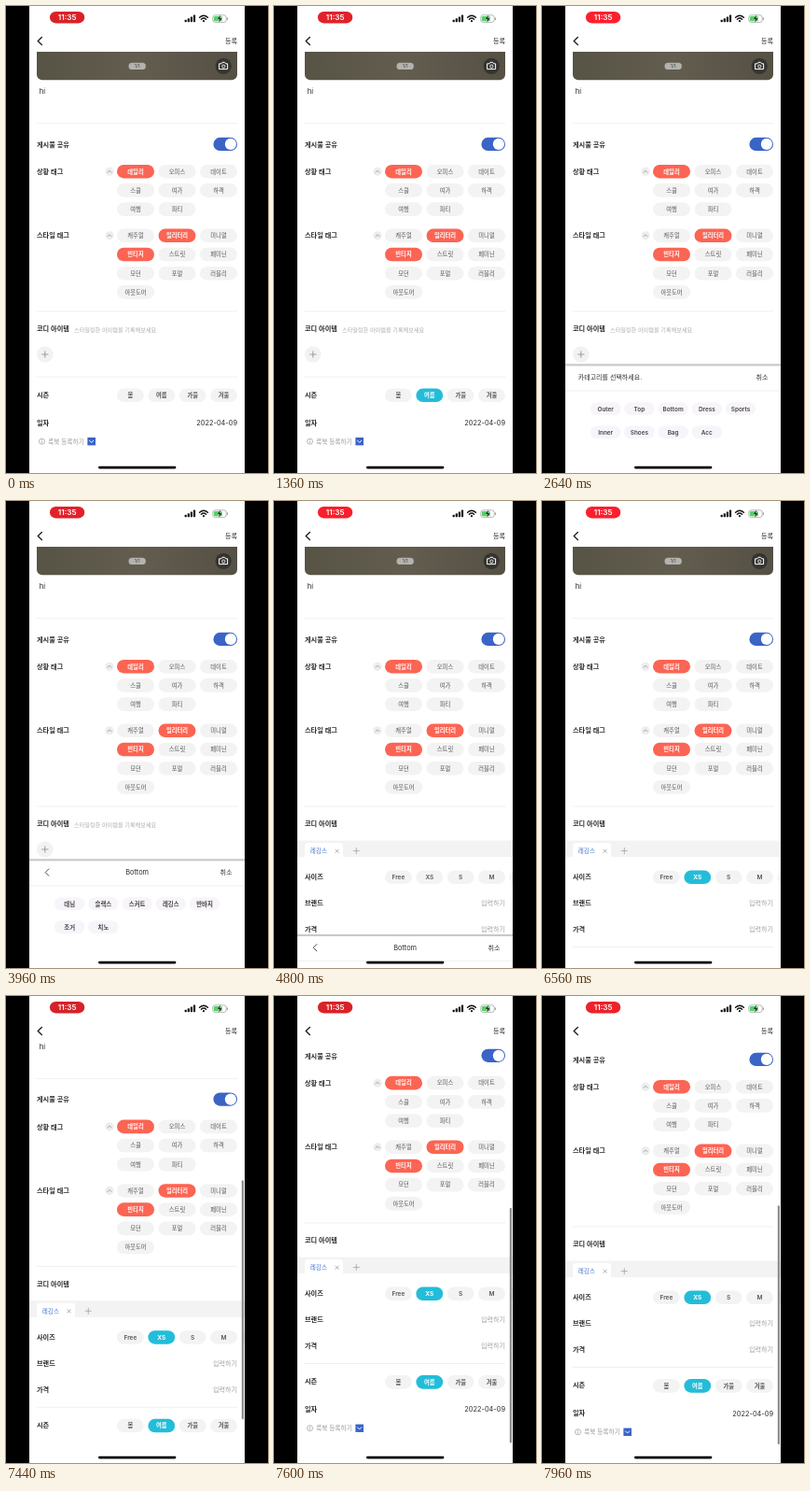
An HTML page for the animation above (8000 ms loop, 281x500 px).

```html
<!DOCTYPE html>
<html lang="ko">
<head>
<meta charset="utf-8">
<style>
html, body { margin: 0; width: 100%; height: 100%; overflow: hidden; background: #000; }
svg { display: block; width: 100%; height: 100%; font-family: Inter, "Noto Sans CJK KR", "Noto Sans CJK", sans-serif; }
</style>
</head>
<body>
<svg id="stage" viewBox="0 0 281 500"></svg>
<script>
const LOOP = 8000;
const INK = '#2b2b2b', GREY = '#a0a0a0', LINE = '#ececec', CHIP = '#f3f3f4';
const CORAL = '#fc6453', TEAL = '#23bdd9', BLUE = '#3a64c6';

const rect = (x, y, w, h, fill, r = 0, more = '') =>
  `<rect x="${x}" y="${y}" width="${w}" height="${h}" rx="${r}" fill="${fill}" ${more}/>`;
const path = (d, color, width = 1, more = '') =>
  `<path d="${d}" fill="none" stroke="${color}" stroke-width="${width}" stroke-linecap="round" stroke-linejoin="round" ${more}/>`;
const circle = (x, y, r, fill, more = '') => `<circle cx="${x}" cy="${y}" r="${r}" fill="${fill}" ${more}/>`;
// y is the vertical middle of the line
const text = (s, x, y, { size = 7.2, fill = INK, weight = 400, anchor = 'start' } = {}) =>
  `<text x="${x}" y="${y + size * 0.37}" font-size="${size}" fill="${fill}" font-weight="${weight}" text-anchor="${anchor}">${s}</text>`;
const label = (s, y) => text(s, 33, y, { weight: 600 });
const right = (s, y, fill = INK, size = 7.1, x = 248) => text(s, x, y, { size, fill, anchor: 'end' });
const divider = y => rect(33, y - 0.4, 215, 0.8, LINE);
const group = (id, body, more = '') => `<g id="${id}" ${more}>${body}</g>`;

function chip(s, x, y, w, { bg = CHIP, fg = '#555', size = 6.3, weight = 500, h = 14.6 } = {}) {
  return rect(x, y - h / 2, w, h, bg, h / 2) + text(s, x + w / 2, y, { size, fill: fg, weight, anchor: 'middle' });
}
const active = bg => ({ bg, fg: '#fff', weight: 700 });

function tagGrid(title, y, names, picked) {
  const chips = names.map((n, i) =>
    chip(n, 119 + (i % 3) * 44.5, y + Math.floor(i / 3) * 20.2, 40, picked.includes(n) ? active(CORAL) : {}));
  return label(title, y) + circle(111, y, 4.6, '#ededed') +
    path(`M109 ${y + 1}l2 -2l2 2`, '#888', 0.7) + chips.join('');
}

// Row of narrow chips with one extra highlighted chip that can be toggled
function chipRow(id, y, names, picked, size) {
  const x = i => 119 + i * 33.4;
  return names.map((n, i) => chip(n, x(i), y, 28.8, { size, weight: 600 })).join('') +
    group(id, chip(names[picked], x(picked), y, 28.8, { ...active(TEAL), size }));
}

function panelChips(names, perRow) {
  return names.map((n, i) => chip(n, 52 + (i % perRow) * 36.2, 431.3 + Math.floor(i / perRow) * 25, 32.4,
    { bg: '#f8f5fa', fg: '#444', size: 6.4, weight: 600, h: 14 })).join('');
}

const statusBar =
  rect(47, 6, 37.2, 12.4, '#f8202c', 6.2, 'id="pill"') +
  text('11:35', 65.6, 12.2, { size: 8.2, fill: '#fff', weight: 600, anchor: 'middle' }) +
  [2.4, 4, 5.8, 7.6].map((h, i) => rect(191.6 + i * 3.1, 17.2 - h, 2.2, h, '#111', 0.6)).join('') +
  path('M207.6 12.2Q212 8.2 216.4 12.2', '#111', 1.5) +
  path('M209.4 14.2Q212 12 214.6 14.2', '#111', 1.4) + circle(212, 16.2, 1.1, '#111') +
  rect(221.8, 9.8, 14.4, 7.6, 'none', 2.4, 'stroke="#999" stroke-width=".7"') +
  rect(222.9, 10.9, 9, 5.4, '#4fd365', 1.4) + rect(236.9, 12.3, 1, 2.6, '#999', 0.5) +
  '<path d="M230.3 8.9L226.6 14.1H229L228 18.3L231.8 13H229.4Z" fill="#111" stroke="#fff" stroke-width=".3"/>';

const header = path('M38.4 33.6L34.2 37.6L38.4 41.6', '#222', 1.4) + right('등록', 37.3);

const photo =
  rect(33, 30, 215, 49.2, 'url(#shade)', 6) +
  rect(131.5, 60.7, 18.4, 7.4, '#b3b2ad', 3.7) +
  text('1/1', 140.7, 64.5, { size: 5, fill: '#444', anchor: 'middle' }) +
  circle(233.2, 64.3, 8.6, '#363431') +
  path('M229 61.8h2l1-1.5h2.6l1 1.5h2v5.8h-8.6z', '#fff', 1) +
  circle(233.3, 64.6, 1.6, 'none', 'stroke="#fff" stroke-width=".9"');

const emptyItems =
  text('스타일링한 아이템을 기록해보세요', 73, 346.8, { size: 6.15, fill: '#aaa' }) +
  circle(41.8, 373, 8.8, '#f2f2f2') + path('M38.6 373h6.4M41.8 369.8v6.4', '#888', 0.8);

const itemForm =
  rect(25, 363.6, 231, 17.6, '#f3f3f3') +
  '<path d="M33 381.2V369.5Q33 366 36.5 366H70.5Q74 366 74 369.5V381.2Z" fill="#fff"/>' +
  text('레깅스', 38.8, 374.7, { size: 6.6, fill: '#3f72cc' }) +
  path('M66 373.2l3.2 3.2m0 -3.2l-3.2 3.2', '#888', 0.7) +
  path('M85.2 374.6h6.2M88.3 371.5v6.2', '#999', 0.7) +
  label('사이즈', 402.8) + chipRow('sizePick', 402.8, ['Free', 'XS', 'S', 'M', 'L'], 1, 6.5) +
  label('브랜드', 430.7) + right('입력하기', 430.7, GREY) +
  label('가격', 458.8) + right('입력하기', 458.8, GREY);

const footer =
  divider(397) + label('시즌', 416.2) +
  chipRow('seasonPick', 416.8, ['봄', '여름', '가을', '겨울'], 1, 6.3) +
  label('일자', 446) + right('2022-04-09', 446.2, INK, 7.4) +
  circle(38.5, 466.2, 3, 'none', 'stroke="#999" stroke-width=".7"') +
  path('M38.5 466v1.7M38.5 464.6v.1', '#999', 0.7) +
  text('룩북 등록하기', 45, 466.3, { size: 6.7, fill: '#999' }) +
  rect(87.4, 462, 8.6, 8.4, BLUE) + path('M89.6 465.3l2.1 2.1l2.1 -2.1', '#fff', 1);

const content = photo + text('hi', 35.8, 91.4, { size: 7.6 }) + divider(125.8) +
  label('게시물 공유', 147.9) +
  rect(222.4, 140.8, 25.6, 14.2, BLUE, 7.1) + circle(240.9, 147.9, 6.1, '#fff') +
  tagGrid('상황 태그', 177.2, ['데일리', '오피스', '데이트', '스쿨', '여가', '하객', '여행', '파티'], ['데일리']) +
  tagGrid('스타일 태그', 245.8, ['캐주얼', '밀리터리', '미니멀', '빈티지', '스트릿', '페미닌', '모던', '포멀', '러블리', '아웃도어'],
    ['밀리터리', '빈티지']) +
  divider(327) + label('코디 아이템', 345.8) +
  group('empty', emptyItems) + group('form', itemForm) + group('footer', footer);

const panel =
  rect(25, 383.4, 231, 120, '#fff') + rect(25, 383.2, 231, 2.2, '#c9c9cb') +
  rect(25, 411.6, 231, 0.8, LINE) + right('취소', 397.6, INK, 7.1, 242.6) +
  group('allKinds', text('카테고리를 선택하세요.', 38.8, 397.6, { size: 7 }) +
    panelChips(['Outer', 'Top', 'Bottom', 'Dress', 'Sports', 'Inner', 'Shoes', 'Bag', 'Acc'], 5)) +
  group('bottomKinds', path('M45.8 394L42.2 397.6L45.8 401.2', '#333', 0.9) +
    text('Bottom', 140.6, 397.6, { size: 7.4, anchor: 'middle' }) +
    panelChips(['데님', '슬랙스', '스커트', '레깅스', '반바지', '조거', '치노'], 5));

const stage = document.getElementById('stage');
stage.innerHTML =
  `<defs><linearGradient id="shade"><stop stop-color="#575345"/><stop offset=".5" stop-color="#625d4f"/><stop offset="1" stop-color="#555044"/></linearGradient>
  <clipPath id="screen"><rect x="25" width="231" height="500"/></clipPath>
  <clipPath id="view"><rect x="25" y="49" width="231" height="432"/></clipPath></defs>` +
  rect(0, 0, 281, 500, '#000') + rect(25, 0, 231, 500, '#fff') +
  `<g clip-path="url(#view)">${group('page', content)}</g>` + statusBar + header +
  rect(252.8, 174, 2.2, 256, '#8c8c8c', 1.1, 'id="bar"') +
  `<g clip-path="url(#screen)">${group('panel', panel)}</g>` +
  rect(99, 492.8, 83.4, 2.6, '#000', 1.3);

const $ = id => document.getElementById(id);
const show = (id, on) => $(id).setAttribute('display', on ? 'inline' : 'none');
const shift = (id, y) => $(id).setAttribute('transform', `translate(0 ${y})`);
const ramp = (t, a, b) => Math.min(1, Math.max(0, (t - a) / (b - a)));
const easeOut = p => 1 - (1 - p) ** 3;

// Drag, overshoot past the end of the page, then settle
const SCROLL = [[7260, 0], [7340, 9], [7440, 37], [7520, 64], [7600, 84], [7640, 86]];
function scrollAt(t) {
  if (t >= 7640) return 80 + 6 * (1 - ramp(t, 7640, 7920)) ** 3;
  for (let i = 1; i < SCROLL.length; i++) {
    const [t0, a] = SCROLL[i - 1], [t1, b] = SCROLL[i];
    if (t < t1) return a + (b - a) * ramp(t, t0, t1);
  }
}

function draw(t) {
  const glow = 0.5 - 0.5 * Math.cos((t - 7420) / 1900 * 2 * Math.PI);
  const mix = (a, b) => Math.round(a + (b - a) * glow);
  $('pill').setAttribute('fill', `rgb(${mix(214, 252)},${mix(34, 32)},${mix(40, 45)})`);

  const added = t >= 4660;
  show('empty', !added);
  show('form', added);
  shift('footer', added ? 80.6 : 0);
  show('seasonPick', t >= 1280);
  show('sizePick', t >= 6320);

  show('panel', t > 2530 && t < 4862);
  shift('panel', 116 * (1 - easeOut(ramp(t, 2530, 2640)) + ramp(t, 4662, 4862)));
  show('allKinds', t < 3240);
  show('bottomKinds', t >= 3240);

  const y = scrollAt(t);
  shift('page', -y);
  show('bar', t >= 7280);
  $('bar').setAttribute('y', 173.8 + y * 0.63);
  $('bar').setAttribute('height', 256 - Math.max(0, y - 80));
}

const start = performance.now();
function tick(now) {
  draw(Math.max(0, now - start) % LOOP);
  requestAnimationFrame(tick);
}
draw(0);
requestAnimationFrame(tick);
</script>
</body>
</html>
```
